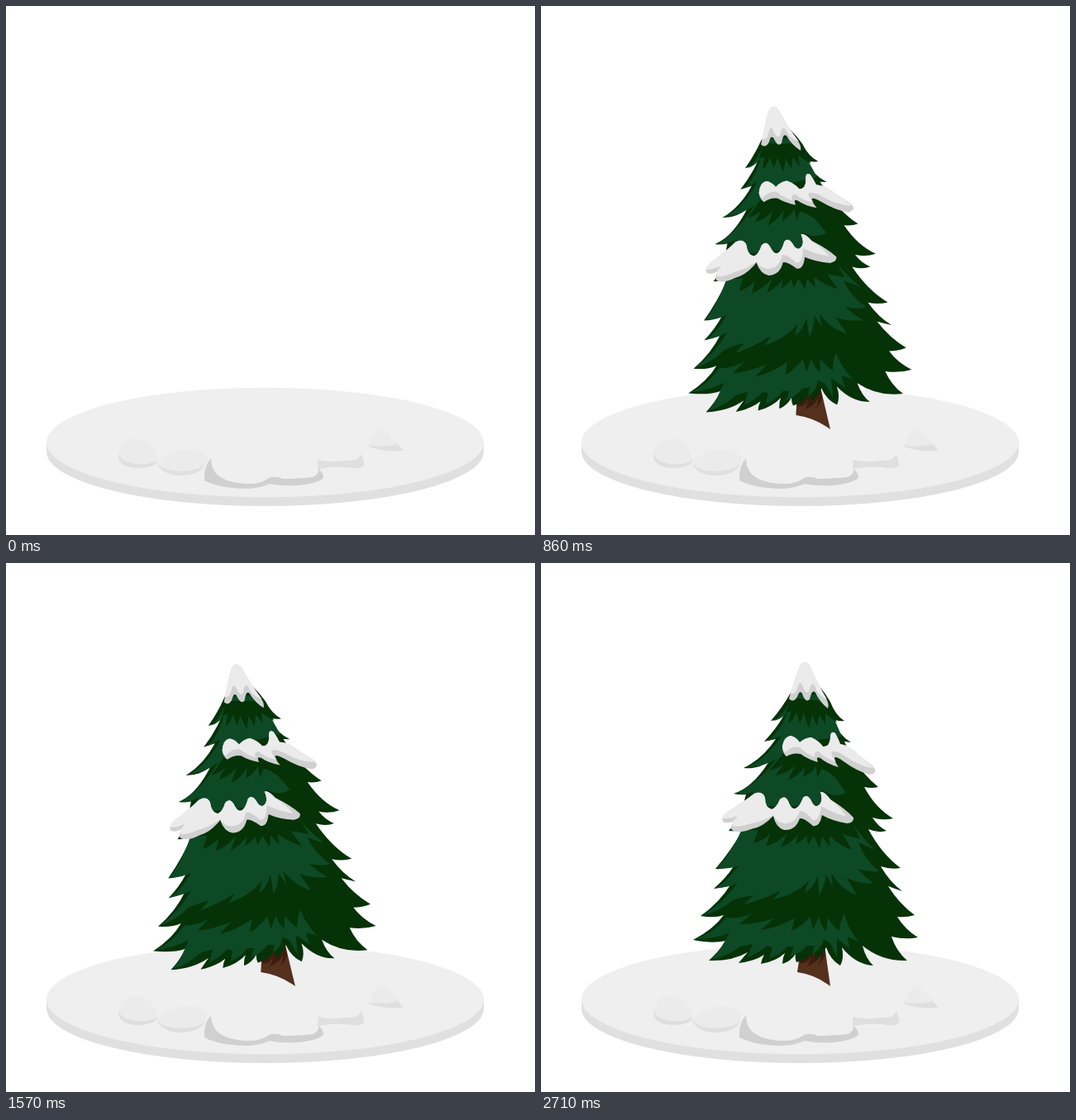
An HTML page that plays this animation: 640x640 px, repeating every 2780 ms.

```html
<!DOCTYPE html>
<html lang="en">
<head>
<meta charset="utf-8">
<title>Snowy tree</title>
<style>
html, body { margin: 0; width: 100%; height: 100%; overflow: hidden; background: #fff; }
svg { display: block; width: 100%; height: 100%; }
.dark { fill: #053206; }
.light { fill: #0e4926; }
.snow { fill: #ebebeb; }
.shade { fill: #d0d0d0; }
.rock { fill: #ebebeb; }
.rim { fill: #dfdfdf; }
</style>
</head>
<body>
<svg viewBox="0 0 640 640">
  <g id="ground">
    <path fill="#e0e0e0" d="M49 528V539A264.5 66 0 0 0 578 539V528Z"/>
    <ellipse fill="#efefef" cx="313.5" cy="528" rx="264.5" ry="66.3"/>
    <path class="rim" d="M136 541Q134 559 162 559Q181 558 184 549Q172 556 158 554Z"/>
    <path class="rock" d="M136 542Q140 526 150 525Q165 521 174 530Q181 538 183 549Q173 555 158 554Q140 552 136 542Z"/>
    <path class="rim" d="M183 554Q190 568 212 568Q234 567 240 556L243 545L236 550Z"/>
    <path class="rock" d="M183 554Q190 542 208 538Q232 533 241 544Q243 549 239 556Q232 562 212 563Q192 563 183 554Z"/>
    <path class="shade" d="M248 547Q239 557 240 574Q258 584 293 584Q308 583 319 578Q332 581 352 580Q376 578 384 571Q384 564 377 559L377 556Q381 566 371 570Q350 572 335 572Q326 568 318 571Q308 579 290 578Q262 576 253 564Q248 557 248 547Z"/>
    <path class="rim" d="M377 549Q395 553 410 550Q428 551 429 542Q433 547 433 556Q430 560 420 559Q400 556 378 560Z"/>
    <path class="rim" d="M439 530L439 533Q456 540 481 538L473 529Z"/>
    <path class="rock" d="M439 532Q446 514 455 512Q464 517 474 530Q460 534 439 532Z"/>
  </g>
  <g id="trunk">
    <path fill="#54301d" d="M315 462L310 495Q332 498 350 512L342 455Z"/>
    <path fill="#3c1d10" d="M315 462L313 484Q322 486 326 476Q325 485 321 488Q334 484 338 475Q339 482 334 487Q341 482 344 474L342 455Z"/>
  </g>
  <g id="leaves">
    <path class="dark" d="M318 130Q340 150 350 168Q356 184 367 191Q358 192 350 187Q360 208 375 217L367 216Q382 250 408 271Q400 273 391 271Q405 297 426 309Q414 312 401 308Q408 319 418 324Q408 327 396 322Q412 352 435 369Q423 371 411 367Q422 386 437 397Q428 394 420 391Q433 412 452 426Q442 429 431 428Q440 443 456 453Q441 456 424 452Q430 470 443 481Q412 482 389 463Q393 479 402 487Q381 486 364 465Q367 478 362 487Q350 480 345 465Q340 475 331 480Q332 474 331 470Q323 480 309 483Q307 478 308 473Q302 482 292 485Q292 478 295 472Q284 482 266 485Q267 479 270 474Q258 482 239 484Q244 478 250 471Q231 482 203 481Q215 470 224 457Q208 461 184 456Q209 443 221 426Q210 430 193 427Q216 411 230 388Q221 393 209 394Q224 381 233 367Q222 371 211 370Q230 348 244 323Q236 325 227 324Q240 311 248 280Q240 281 233 279Q256 272 276 240Q262 250 245 248Q268 237 284 213L270 216Q285 200 294 184Q286 190 278 191Q292 175 302 157Z"/>
    <path class="light" d="M306 158Q294 184 281 191Q291 189 298 181Q289 204 275 215L291 209Q272 238 249 247Q272 247 290 233L304 218L364 210L351 180L342 160Z"/>
    <path class="dark" d="M303 163L296 181L303 179L299 194Q306 190 309 180L313 194L318 182L324 200L328 184L334 197L337 183L344 195L344 182L358 193L349 168Z"/>
    <path class="light" d="M292 228Q264 266 237 279Q248 281 258 276L244 294L342 294Q337 279 341 275Q355 285 369 278L353 255Z"/>
    <path class="dark" d="M296 227L276 251Q286 249 293 244L284 257Q299 254 307 245L299 263Q312 257 320 246L317 259Q329 253 333 245L334 260L341 247L355 259L354 248Q364 259 377 264L366 236Z"/>
    <path class="light" d="M244 320Q230 352 213 369Q227 371 239 366Q227 384 212 393Q226 393 238 387Q219 413 195 426Q216 422 232 408Q246 403 258 402Q250 408 246 413Q272 406 290 396Q285 403 281 407Q309 401 324 384L319 399Q330 393 335 378L336 402Q343 393 345 377L353 392L351 375Q363 395 382 402L370 381Q384 388 403 388Q392 380 383 370Q396 374 409 373Q391 358 384 338L404 347Q387 331 378 316Z"/>
    <path class="dark" d="M242 320Q251 324 263 323L257 339Q270 335 277 328L272 343Q287 338 298 327L290 344Q304 338 311 329L308 340Q318 335 321 330L323 341L330 330L337 345L340 331L349 343L349 330Q362 342 376 347L365 328L386 334L374 308H260Z"/>
    <path class="light" d="M224 429Q210 447 187 455Q211 455 228 447Q219 466 206 480Q227 475 241 464L256 461L250 477Q265 471 274 463L280 465L276 478Q290 474 298 464L306 465L301 476Q316 471 322 463L331 463L328 473Q339 468 342 455L350 460L358 478L358 454L374 467Q371 459 371 452L384 458Q370 440 367 424Q362 432 361 445Q354 441 347 429L345 446Q339 439 336 428L329 444L326 428Q315 440 303 445L307 430Q286 441 266 444L282 430Q260 437 240 437L256 423Q242 431 224 429Z"/>
    <path class="shade" d="M319 120C312 120 310 135 304 151L300 164Q305 170 310 162Q313 153 316 158Q320 170 325 165Q328 152 332 157Q337 168 347 176Q349 171 345 164Q334 145 327 128Q324 120 319 120Z"/>
    <path class="snow" d="M319 120C312 120 310 135 304 151L301 158Q307 160 310 152Q313 142 316 147Q319 159 324 156Q327 143 331 148Q334 160 346 165Q334 145 327 128Q324 120 319 120Z"/>
    <path class="shade" d="M292 222Q294 210 302 209Q308 210 313 217Q320 211 327 211Q336 215 341 222Q349 223 350 212Q350 202 356 206Q360 213 362 219Q374 221 384 232L402 246Q408 254 398 256Q382 252 366 240Q356 233 355 236Q356 242 360 247Q346 243 338 236Q332 233 335 241Q322 237 314 231Q305 229 297 234Q292 230 292 222Z"/>
    <path class="snow" d="M292 222Q294 210 302 209Q308 210 313 217Q320 211 327 211Q336 215 341 222Q349 223 350 212Q350 202 356 206Q360 213 362 219Q374 221 384 232L403 248Q386 247 367 233Q356 226 351 229Q352 235 356 240Q343 236 336 228Q330 227 331 235Q320 230 313 223Q303 221 296 229Q292 227 292 222Z"/>
    <path class="shade" d="M219 309Q222 302 232 297Q248 287 258 279Q268 275 271 284Q271 296 279 298Q285 296 289 286Q295 280 299 288Q303 299 308 297Q313 295 317 284Q323 278 328 290Q333 298 338 291Q341 286 338 277Q343 276 350 286Q368 297 378 308Q379 314 370 315Q352 312 340 305Q337 320 329 318Q318 308 313 309Q308 324 294 323Q284 320 281 306Q268 320 254 322Q238 328 231 323Q228 319 234 312Q226 316 220 313Z"/>
    <path class="snow" d="M219 309Q222 302 232 297Q248 287 258 279Q268 275 271 284Q271 296 279 298Q285 296 289 286Q295 280 299 288Q303 299 308 297Q313 295 317 284Q323 278 328 290Q333 298 338 291Q341 286 338 277Q343 276 350 286Q356 291 362 297L370 307Q352 302 339 294Q337 312 329 311Q319 299 313 300Q308 316 294 315Q284 313 281 305Q268 313 254 315Q240 320 232 318Q231 313 238 306Q228 310 219 309Z"/>
  </g>
</svg>
<script>
const LOOP = 2780, FPS = 14;
const leaves = document.getElementById("leaves");
const trunk = document.getElementById("trunk");

// [time in ms, value]
const size = [[0, 0], [430, 1.145], [571, 1.063], [720, 0.985], [857, 0.998], [1070, 1.01],
  [1286, 0.983], [1430, 1.018], [1571, 0.997], [1780, 1.007], [1930, 0.995], [2214, 0.998], [2714, 1]];
const tilt = [[0, 0], [400, 2], [571, 0.5], [820, -5.6], [857, -5.4], [1230, 4.6], [1286, 4.3],
  [1571, -5.8], [1900, 4.6], [2214, -0.6], [2360, -2.5], [2714, 0]];

function at(keys, t) {
  const i = keys.findIndex(k => k[0] > t);
  if (i < 0) return keys[keys.length - 1][1];
  const [t0, a] = keys[i - 1], [t1, b] = keys[i];
  const u = (1 - Math.cos(Math.PI * (t - t0) / (t1 - t0))) / 2;
  return a + (b - a) * u;
}

function draw(ms) {
  const t = Math.floor((ms % LOOP + 5) * FPS / 1000) * 1000 / FPS;
  const s = at(size, t), a = at(tilt, t);
  const shown = s > 0 ? "inline" : "none";
  leaves.setAttribute("display", shown);
  trunk.setAttribute("display", shown);
  leaves.setAttribute("transform",
    `translate(312 525) rotate(${a}) scale(${s}) translate(-312 -525)`);
  trunk.setAttribute("transform",
    `translate(325 490) scale(${s}) translate(-325 22) skewX(${-a}) translate(0 -512)`);
}

const start = performance.now();
function tick() {
  draw(performance.now() - start);
  requestAnimationFrame(tick);
}
tick();
</script>
</body>
</html>
```
